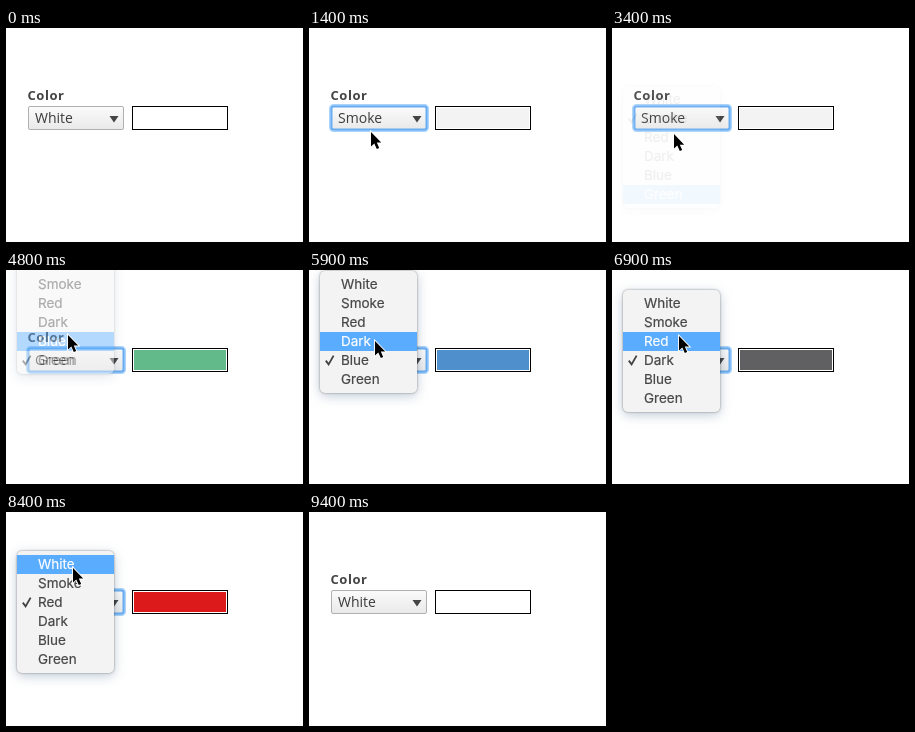
Animation of 297 by 214 pixels, one loop 9900 ms. Source, as an HTML page:

```html
<!DOCTYPE html>
<html lang="en">
<head>
<meta charset="utf-8">
<title>Color select</title>
<style>
  html, body { margin: 0; width: 100%; height: 100%; overflow: hidden; background: #fff; }
  svg { display: block; width: 297px; height: 214px; }
  .label { font: 700 13px "Open Sans", sans-serif; letter-spacing: .55px; fill: #444; }
  .value { font: 14px "Open Sans", sans-serif; fill: #3c3c3c; }
  .item { font: 13.5px Inter, sans-serif; fill: #464646; stroke: #464646; stroke-width: .2; }
  .item.on { fill: #fff; stroke: #fff; }
  #panel {
    filter: drop-shadow(0 0 .8px rgba(0, 0, 0, .4)) drop-shadow(0 3px 6px rgba(40, 75, 115, .28));
  }
</style>
</head>
<body>
<svg viewBox="0 0 297 214">
  <defs>
    <linearGradient id="face" x2="0" y2="1">
      <stop stop-color="#fbfbfb"/>
      <stop offset="1" stop-color="#e9e9e9"/>
    </linearGradient>
  </defs>
  <text class="label" x="21.5" y="72">Color</text>
  <rect x="22.5" y="78.5" width="95" height="23" rx="1.5" fill="url(#face)" stroke="#b0b0b0"/>
  <g id="ring" fill="none">
    <rect x="21" y="77" width="98" height="26" rx="3.5" stroke="#acd4fb" stroke-width="2"/>
    <rect x="22.5" y="78.5" width="95" height="23" rx="2" stroke="#68adf2" stroke-width="2"/>
  </g>
  <text class="value" id="value" x="29" y="95"></text>
  <path d="M103.5 88h9l-4.5 6.5z" fill="#444"/>
  <rect x="126.5" y="78.5" width="95" height="23" fill="#fff" stroke="#000"/>
  <rect id="swatch" x="128" y="80" width="92" height="20"/>
  <g id="menu">
    <rect id="panel" x="11" y="-4" width="97" height="122" rx="5" fill="#f3f3f3"/>
    <rect id="bar" x="11" width="97" height="19" fill="#5aacfe"/>
    <path id="check" d="M16.8 9.6l2.8 3.8 5-8.8" fill="none" stroke="#404040" stroke-width="1.8"/>
  </g>
  <path id="cursor" d="M0 0V14.4l3.3-3 2.5 5.6 2.4-1-2.4-5.4H10.2Z" fill="#000"
        stroke="#fff" stroke-width="1.8" paint-order="stroke"/>
</svg>
<script>
const LOOP = 9900, STEP = 100, ROW = 19, ROW_TOP = 81;
const COLORS = [
  ['White', '#ffffff'], ['Smoke', '#f3f3f3'], ['Red', '#dc1a1b'],
  ['Dark', '#606062'], ['Blue', '#4f8fcc'], ['Green', '#62b98a']
];
const FADE = [.85, .45, .08];
const FADE_TIME = FADE.length * STEP;
const TIME_PER_ROW = 300, RETURN_DELAY = 100, RETURN_TIME = 150;
const REST = 93, LOW_REST = 104, OFF_STAGE = 230;

// Each visit to the menu: row picked, opening time, start of fade, pointer goal.
const VISITS = [
  { pick: 1, open: 400, fade: 900, x: 63, y: 107 },
  { pick: 5, open: 1700, fade: 3200, x: 62, y: 160 },
  { pick: 4, open: 3700, fade: 4700, x: 62, y: 65 },
  { pick: 3, open: 5400, fade: 6100, x: 66, y: 71 },
  { pick: 2, open: 6600, fade: 7300, x: 67, y: 66 },
  { pick: 0, open: 7800, fade: 8700, x: 67, y: 56 }
];

const clamp = (v, lo, hi) => Math.min(hi, Math.max(lo, v));
const mix = (a, b, k) => a + (b - a) * k;
const easeOut = k => 1 - (1 - k) ** 3;

const $ = id => document.getElementById(id);
const [ring, value, swatch, menu, bar, check, cursor] =
  ['ring', 'value', 'swatch', 'menu', 'bar', 'check', 'cursor'].map($);

const items = COLORS.map(([name], i) => {
  const text = document.createElementNS('http://www.w3.org/2000/svg', 'text');
  text.setAttribute('x', 32);
  text.setAttribute('y', i * ROW + 14);
  text.textContent = name;
  menu.append(text);
  return text;
});

const selectedBefore = i => i > 0 ? VISITS[i - 1].pick : 0;

// Where the pointer waits after visit i.
function restAfter(i) {
  if (i < 0) return REST;
  return i === VISITS.length - 1 ? OFF_STAGE : clamp(VISITS[i].y, REST, LOW_REST);
}

function pointerAt(t, i) {
  if (i < 0) return [VISITS[0].x, REST];
  const visit = VISITS[i], next = VISITS[i + 1] || visit;
  const rows = Math.abs(visit.pick - selectedBefore(i));
  const go = clamp((t - visit.open) / (TIME_PER_ROW * rows), 0, 1);
  const back = easeOut(clamp((t - visit.fade - RETURN_DELAY) / RETURN_TIME, 0, 1));
  return [
    mix(visit.x, next.x, back),
    mix(mix(restAfter(i - 1), visit.y, go), restAfter(i), back)
  ];
}

function drawMenu(t, i, tipY) {
  const open = i >= 0 && t < VISITS[i].fade + FADE_TIME;
  menu.style.display = open ? '' : 'none';
  if (!open) return;
  const { pick, fade } = VISITS[i];
  const selected = selectedBefore(i);
  const top = ROW_TOP - selected * ROW;
  const pointed = clamp(Math.floor((tipY - top) / ROW), 0, COLORS.length - 1);
  const hovered = t < fade ? pointed : pick;
  menu.setAttribute('transform', `translate(0 ${top})`);
  menu.style.opacity = t < fade ? 1 : FADE[(t - fade) / STEP];
  bar.setAttribute('y', hovered * ROW);
  check.setAttribute('transform', `translate(0 ${selected * ROW})`);
  check.setAttribute('stroke', hovered === selected ? '#fff' : '#404040');
  items.forEach((item, row) => item.setAttribute('class', row === hovered ? 'item on' : 'item'));
}

function draw(now) {
  const t = Math.floor(now % LOOP / STEP) * STEP;
  const i = VISITS.filter(v => t >= v.open).length - 1;
  const tip = pointerAt(t, i);
  const picked = i >= 0 && t >= VISITS[i].fade + FADE_TIME;
  const [name, color] = COLORS[picked ? VISITS[i].pick : selectedBefore(i)];

  value.textContent = name;
  swatch.setAttribute('fill', color);
  ring.style.opacity = t < VISITS[0].open ? 0 : clamp((9400 - t) / 200, 0, 1);
  cursor.style.display = t < 200 ? 'none' : '';
  cursor.setAttribute('transform', `translate(${tip})`);
  drawMenu(t, i, tip[1]);
}

const start = performance.now();
function tick() {
  draw(performance.now() - start);
  requestAnimationFrame(tick);
}
tick();
</script>
</body>
</html>
```
